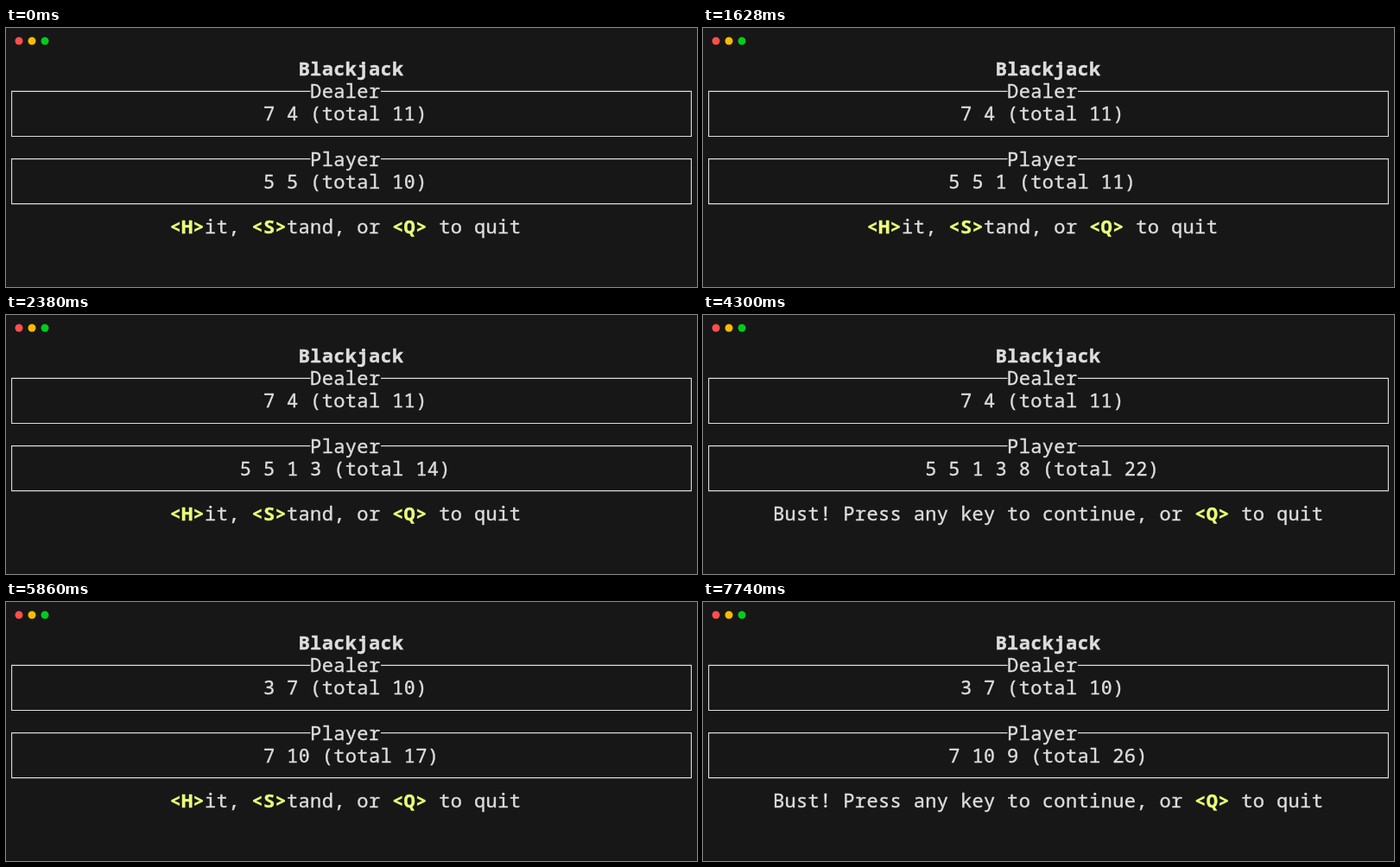
Write an HTML page that moves like this. It is 800 by 300 pixels and loops after 8000 ms.

```html
<!DOCTYPE html>
<html lang="en">
<head>
<meta charset="utf-8">
<title>Blackjack</title>
<style>
  html, body { margin: 0; width: 100%; height: 100%; overflow: hidden; background: #171717; }
  svg { display: block; width: 800px; height: 300px; }
  text {
    font: 22px "Noto Sans Mono", monospace; text-anchor: middle; white-space: pre;
    color: #ddd; fill: currentColor; stroke: currentColor; stroke-width: 0.4px;
  }
  tspan { fill: currentColor; stroke: currentColor; }
  .title { font-weight: 700; }
  .key { font-weight: 700; color: #ebff7a; }
  .zero { font: 21.5px "DejaVu Sans Mono", monospace; }
  .box { fill: none; stroke: #ddd; stroke-width: 1.1; }
</style>
</head>
<body>
<svg viewBox="0 0 800 300">
  <circle cx="15" cy="15" r="4.5" fill="#ff4f4d"/>
  <circle cx="30" cy="15" r="4.5" fill="#febb00"/>
  <circle cx="45" cy="15" r="4.5" fill="#00cc1d"/>
  <path class="box" d="M352.5 73.4H6.6V125.5H793.4V73.4H434"/>
  <path class="box" d="M352.5 151.6H6.6V203.6H793.4V151.6H434"/>
</svg>
<script>
const NS = "http://www.w3.org/2000/svg";
const COLS = 59, CELL = 800 / COLS, LEFT = -0.6;
const ROW = 26.1, TOP = 55.1, LOOP = 8000;
const svg = document.querySelector("svg");

const HIT = "<H>it, <S>tand, or <Q> to quit";
const BUST = "Bust! Press any key to continue, or <Q> to quit";
const steps = [
  [0, "7 4 (total 11)", "5 5 (total 10)", HIT],
  [500, "7 4 (total 11)", "5 5 1 (total 11)", HIT],
  [2380, "7 4 (total 11)", "5 5 1 3 (total 14)", HIT],
  [4300, "7 4 (total 11)", "5 5 1 3 8 (total 22)", BUST],
  [5860, "3 7 (total 10)", "7 10 (total 17)", HIT],
  [7740, "3 7 (total 10)", "7 10 9 (total 26)", BUST]
];

function addRow(row) {
  const el = document.createElementNS(NS, "text");
  el.setAttribute("y", TOP + row * ROW);
  return svg.appendChild(el);
}

// Centres a line on the character grid, one cell per letter.
function write(el, line) {
  let col = Math.floor((COLS - line.length) / 2);
  el.textContent = "";
  for (const run of line.match(/<.>|0|[^<0]+/g)) {
    const span = document.createElementNS(NS, "tspan");
    const xs = [...run].map(() => (LEFT + (col++ + 0.5) * CELL).toFixed(2));
    span.setAttribute("x", xs.join(" "));
    if (run[0] === "<") span.setAttribute("class", "key");
    if (run === "0") span.setAttribute("class", "zero");
    span.textContent = run;
    el.appendChild(span);
  }
}

const title = addRow(0);
title.setAttribute("class", "title");
write(title, "Blackjack");
write(addRow(1), "Dealer");
write(addRow(4), "Player");
const live = [2, 5, 7].map(addRow);

let shown = null;
function draw(now) {
  const t = now % LOOP;
  const step = steps.findLast(s => s[0] <= t);
  if (step !== shown) {
    live.forEach((el, i) => write(el, step[i + 1]));
    shown = step;
  }
}

const start = performance.now();
function tick() {
  draw(performance.now() - start);
  requestAnimationFrame(tick);
}
tick();
</script>
</body>
</html>
```
